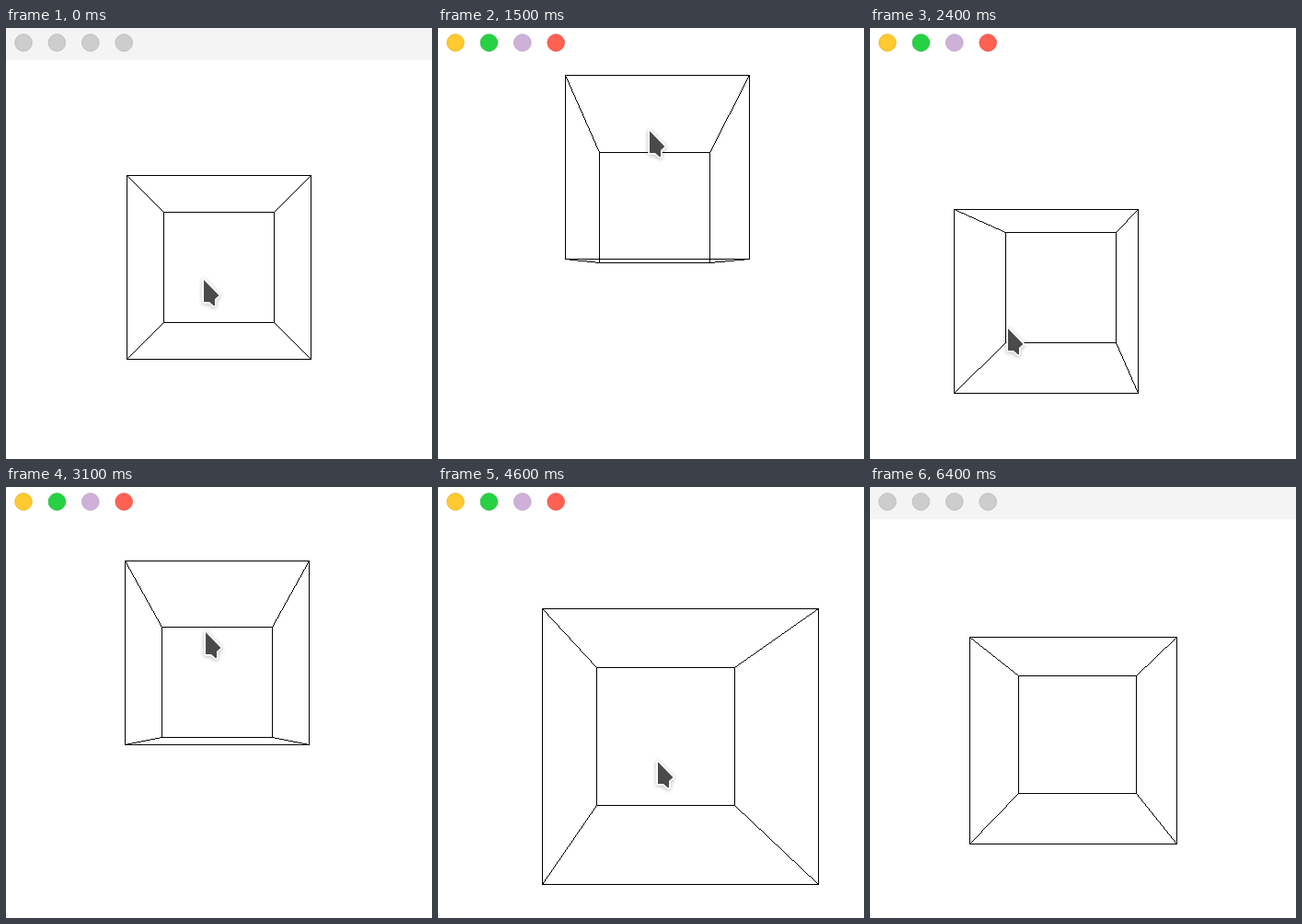
An HTML page with a canvas for the animation above (6500 ms loop, 463 by 469 pixels).

```html
<!DOCTYPE html>
<html lang="en">
<head>
<meta charset="utf-8">
<title>Draggable wireframe box</title>
<style>
  html, body { margin: 0; width: 100%; height: 100%; overflow: hidden; background: #fff; }
  canvas { display: block; }
</style>
</head>
<body>
<canvas id="stage" width="463" height="469"></canvas>
<script>
const ctx = document.getElementById('stage').getContext('2d');
const LOOP = 6500, STEP = 100;
const EYE = [231, 260.5];
const DEPTH = 6, FOCAL = 1800;

// Turning points of the circling drag: step, then box offset from the eye
const path = [
  [7, 0, 0], [11, -42.5, -52], [15, 7.5, -109], [19, 53, -28], [21, 24.5, 19], [24, -39.5, 37],
  [26, -75.5, -5], [28, -63.5, -62], [31, -1.8, -80], [34, 27, -4], [36, 21.5, 14.6]
];

const clamp = (v, lo, hi) => Math.min(hi, Math.max(lo, v));
const ramp = (step, from, to) => clamp((step - from) / (to - from), 0, 1);
const smooth = k => k * k * (3 - 2 * k);
const mix = (a, b, k) => a.map((v, i) => v + (b[i] - v) * k);

// Cubic Hermite curve through the turning points, at rest at both ends
function along(step) {
  const last = path.length - 1;
  const t = clamp(step, path[0][0], path[last][0]);
  const i = Math.max(1, path.findIndex(p => p[0] >= t));
  const a = path[i - 1], b = path[i];
  const span = b[0] - a[0], s = (t - a[0]) / span;
  const slope = (n, axis) => {
    if (n === 0 || n === last) return 0;
    const p = path[n - 1], q = path[n + 1];
    return (q[axis] - p[axis]) / (q[0] - p[0]);
  };
  return [1, 2].map(axis =>
    a[axis] + (b[axis] - a[axis]) * smooth(s) +
    span * s * (1 - s) * (slope(i - 1, axis) * (1 - s) - slope(i, axis) * s));
}

function boxOffset(step) {
  return mix(along(step), [-8.7, 13.95], smooth(ramp(step, 52, 56)));
}

function boxDistance(step) {
  return 9 - 4 * ramp(step, 39, 43) + 3 * ramp(step, 45, 48);
}

// The pointer runs slightly ahead of the box, then leaves through the top
function cursorTip(step) {
  const [x, y] = boxOffset(step + 0.2);
  const drift = ramp(step, 31, 35);
  const tip = [215 + 1.5 * x - 8 * drift, 274 + 1.5 * y + 3 * drift];
  return mix(tip, [124, 12], smooth(ramp(step, 57, 60)));
}

function line([x0, y0], [x1, y1]) {
  const dx = x1 - x0, dy = y1 - y0;
  const n = Math.max(Math.abs(dx), Math.abs(dy));
  for (let i = 0; i <= n; i++) {
    ctx.fillRect(Math.round(x0 + dx * i / n), Math.round(y0 + dy * i / n), 1, 1);
  }
}

function face([ox, oy], distance) {
  const size = FOCAL / distance;
  const corner = (sx, sy) => [
    Math.floor(EYE[0] + size * (ox / 200 + sx / 2)),
    Math.floor(EYE[1] + size * (oy / 200 + sy / 2))
  ];
  return [corner(-1, -1), corner(1, -1), corner(1, 1), corner(-1, 1)];
}

function drawBox(step) {
  const offset = boxOffset(step), z = boxDistance(step);
  const front = face(offset, z), back = face(offset, z + DEPTH);
  ctx.fillStyle = '#000';
  for (let i = 0; i < 4; i++) {
    const j = (i + 1) % 4;
    line(front[i], front[j]);
    line(back[i], back[j]);
    line(front[i], back[i]);
  }
}

function drawBar(active) {
  if (!active) {
    ctx.fillStyle = '#f4f4f4';
    ctx.fillRect(0, 0, 463, 35);
  }
  ['#ffc92f', '#28d143', '#cdb1da', '#ff6153'].forEach((color, i) => {
    ctx.beginPath();
    ctx.arc(19 + i * 36.4, 16, 9.3, 0, Math.PI * 2);
    ctx.fillStyle = active ? color : '#cdcdcd';
    ctx.fill();
    ctx.lineWidth = 0.8;
    ctx.strokeStyle = ctx.fillStyle;
    ctx.stroke();
    ctx.strokeStyle = 'rgba(0,0,0,.1)';
    ctx.stroke();
  });
}

const arrow = new Path2D('M0 0L16.5 17L12 21V28H10.5L6 24H0Z');

function drawCursor([x, y]) {
  ctx.save();
  ctx.translate(Math.round(x), Math.round(y));
  ctx.lineJoin = 'round';
  ctx.lineWidth = 3.4;
  ctx.strokeStyle = '#fff';
  ctx.shadowColor = 'rgba(0,0,0,.3)';
  ctx.shadowBlur = 4;
  ctx.shadowOffsetY = 1;
  ctx.stroke(arrow);
  ctx.shadowColor = 'transparent';
  ctx.fillStyle = '#4a4a4a';
  ctx.fill(arrow);
  ctx.restore();
}

function render() {
  const step = Math.floor(performance.now() % LOOP / STEP);
  ctx.fillStyle = '#fff';
  ctx.fillRect(0, 0, 463, 469);
  drawBar(step >= 6 && step < 64);
  drawBox(step);
  if (step <= 60) drawCursor(cursorTip(step));
  requestAnimationFrame(render);
}
render();
</script>
</body>
</html>
```
